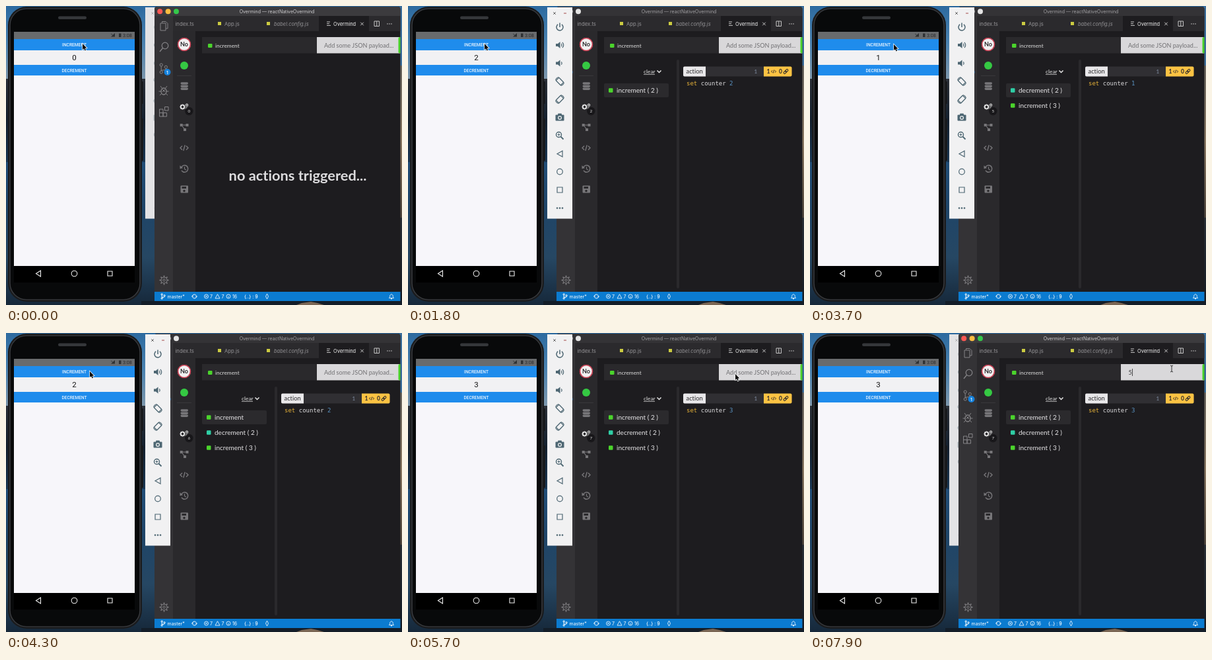
Animation, 600 px wide and 452 px high, one loop 8000 ms. Source, as an HTML page with a canvas:

```html
<!DOCTYPE html>
<html lang="en">
<head>
<meta charset="utf-8">
<title>State devtool demo</title>
<style>
html, body { margin: 0; width: 100%; height: 100%; overflow: hidden; background: #10263d; }
canvas { display: block; width: 100%; height: 100%; }
</style>
</head>
<body>
<canvas id="stage"></canvas>
<script>
const W = 600, H = 452, LOOP = 8000, TICK = 100;
const canvas = document.getElementById('stage');
const ctx = canvas.getContext('2d');
const ratio = Math.max(1, window.devicePixelRatio || 1);
canvas.width = W * ratio;
canvas.height = H * ratio;
ctx.letterSpacing = '0.01px'; // keeps letter pairs such as "ti" separate

const UI = 'Inter, sans-serif', TOOL = 'Lato, sans-serif';
const MONO = '"DejaVu Sans Mono", monospace', PHONE = 'Roboto, sans-serif';
const GREEN = '#4bd42c', TEAL = '#2fcfa6', GREY = '#858487', SLATE = '#4d6672';

// Timeline: [time, step]; the phone shows each result one tick later.
const ACTIONS = [[900, 1], [1400, 1], [2000, 1], [2900, -1], [3300, -1], [4000, 1], [4500, 1]];
const PATH = [[0, 116, 57], [2300, 116, 57], [2700, 120, 95], [3400, 120, 95], [3700, 127, 58],
  [5300, 127, 58], [5700, 496, 62], [6000, 519, 54], [7400, 519, 54], [7700, 548, 54], [8000, 548, 54]];
const TOOLBAR_UP = 500, EDITOR_UP = 6100, TYPED = 7600;

// Drawing helpers
function rect(x, y, w, h, color, r = 0) {
  ctx.fillStyle = color;
  ctx.beginPath();
  ctx.roundRect(x, y, w, h, r);
  ctx.fill();
}
function dot(x, y, r, color) {
  ctx.fillStyle = color;
  ctx.beginPath();
  ctx.arc(x, y, r, 0, Math.PI * 2);
  ctx.fill();
}
function ring(x, y, r, color, width = 1, from = 0, to = Math.PI * 2) {
  ctx.strokeStyle = color;
  ctx.lineWidth = width;
  ctx.beginPath();
  ctx.arc(x, y, r, from, to);
  ctx.stroke();
}
function box(x, y, w, h, color, width = 1, r = 0) {
  ctx.strokeStyle = color;
  ctx.lineWidth = width;
  ctx.beginPath();
  ctx.roundRect(x, y, w, h, r);
  ctx.stroke();
}
function trace(points, close) {
  ctx.beginPath();
  for (let i = 0; i < points.length; i += 2) ctx.lineTo(points[i], points[i + 1]);
  if (close) ctx.closePath();
}
function line(points, color, width = 1, close = false) {
  trace(points, close);
  ctx.strokeStyle = color;
  ctx.lineWidth = width;
  ctx.stroke();
}
function shape(points, color) {
  trace(points, true);
  ctx.fillStyle = color;
  ctx.fill();
}
function text(str, x, y, size, color, family = UI, align = 'left', style = '') {
  ctx.font = `${style} ${size}px ${family}`;
  ctx.fillStyle = color;
  ctx.textAlign = align;
  ctx.textBaseline = 'alphabetic';
  ctx.fillText(str, x, y);
}
function at(x, y, draw, angle = 0) {
  ctx.save();
  ctx.translate(x, y);
  ctx.rotate(angle);
  draw();
  ctx.restore();
}
function gradient(y0, y1, ...colors) {
  const g = ctx.createLinearGradient(0, y0, 0, y1);
  colors.forEach((c, i) => g.addColorStop(i / (colors.length - 1), c));
  return g;
}

// Shared icons, centred on the local origin
function gear(r, color, width = 1.1) {
  ring(0, 0, r * 0.65, color, width);
  for (let i = 0; i < 8; i++) {
    const c = Math.cos(i * Math.PI / 4), s = Math.sin(i * Math.PI / 4);
    line([c * r * 0.7, s * r * 0.7, c * r, s * r], color, width * 1.4);
  }
}
function codeMark(s, color, width) {
  line([-s * 0.5, -s * 0.5, -s, 0, -s * 0.5, s * 0.5], color, width);
  line([s * 0.5, -s * 0.5, s, 0, s * 0.5, s * 0.5], color, width);
  line([s * 0.2, -s * 0.7, -s * 0.2, s * 0.7], color, width);
}
function cross(s, color, width = 1) {
  line([-s, -s, s, s], color, width);
  line([-s, s, s, -s], color, width);
}
function branch(color, s) {
  ring(-s * 0.6, -s, s * 0.38, color);
  ring(-s * 0.6, s, s * 0.38, color);
  ring(s * 0.7, -s * 0.4, s * 0.38, color);
  line([-s * 0.6, -s * 0.6, -s * 0.6, s * 0.6], color);
  line([s * 0.7, 0, s * 0.5, s * 0.4, -s * 0.6, s * 0.5], color);
}
function speaker(waves) {
  shape([-6, -2, -3, -2, 0.5, -5, 0.5, 5, -3, 2, -6, 2], SLATE);
  for (let i = 1; i <= waves; i++) ring(0.5, 0, i * 2.6, SLATE, 1.2, -0.9, 0.9);
}
function rotateIcon(side) {
  at(0, 0, () => box(-3.2, -5, 6.4, 10, SLATE, 1.3, 0.5), -side * Math.PI / 4);
  const mid = side > 0 ? -Math.PI * 0.75 : -Math.PI * 0.25;
  ring(0, 0, 6.6, SLATE, 1.1, mid - 0.55, mid + 0.55);
  ring(0, 0, 6.6, SLATE, 1.1, mid + Math.PI - 0.55, mid + Math.PI + 0.55);
}

function desktop() {
  rect(0, 0, W, 110, gradient(0, 110, '#2d6a9f', '#4a82b0', '#7d97ac'));
  rect(0, 110, W, 126, gradient(110, 236, '#2b3038', '#14202e', '#1a3855'));
  rect(0, 236, W, 216, gradient(236, H, '#214e78', '#1f4568', '#264763', '#16283a'));
  rect(597, 0, 3, 90, '#3d6f9b');
  rect(597, 90, 3, 230, gradient(90, 320, '#6a665f', '#8a7862', '#51473d'));
  rect(597, 320, 3, 132, gradient(320, 452, '#2b3138', '#141a22'));
  rect(205, 446, 395, 6, '#131d28');
  shape([440, 452, 448, 449, 462, 447, 472, 449, 482, 452], '#7a6654');
}

function phone(value) {
  rect(205, 114, 3, 34, '#17191c', 1);
  rect(205, 170, 3, 64, '#17191c', 1);
  rect(3, 1, 203, 446, '#1a1b1d', 28);
  box(6, 4, 197, 440, '#3d3f43', 1.2, 25);
  rect(7, 5, 195, 438, '#08090a', 24);
  rect(79, 15.5, 43, 4.5, '#35373a', 2.2);
  rect(12, 39, 183, 354, '#f7f6fa');
  rect(12, 39, 183, 11, '#696b6d');
  shape([159, 46.5, 165, 46.5, 165, 41], '#2f3133');
  line([159, 42, 163, 45], '#2f3133', 0.8);
  rect(171, 41.5, 3.5, 5.5, '#2f3133', 0.5);
  text('3:08', 177, 47, 7.2, '#28292b', PHONE);
  rect(12, 50, 183, 17, '#1f8cec');
  rect(12, 67, 183, 22, '#f1f1f3');
  rect(12, 89, 183, 16, '#1f8cec');
  text('INCREMENT', 103.5, 60.8, 6.6, '#e8f4ff', PHONE, 'center', '500');
  text('DECREMENT', 103.5, 99.5, 6.5, '#e8f4ff', PHONE, 'center', '500');
  text(value, 103.5, 82, 11.5, '#151515', PHONE, 'center');
  rect(12, 393, 183, 25, '#000');
  line([52.5, 400, 45.5, 404.5, 52.5, 409], '#eee', 1.1, true);
  ring(103.5, 404.5, 4.3, '#eee', 1.1);
  box(154, 401, 7, 7, '#eee', 1.1);
}

function toolbar(active) {
  rect(211, 2, 38, 319.5, active ? '#f1f1f2' : '#e3e3e5');
  ctx.save();
  ctx.globalAlpha = active ? 1 : 0.35;
  at(222, 11, () => cross(1.8, '#555', 0.9));
  line([236, 11, 240, 11], '#a34848', 1);
  at(230, 32, () => {
    ring(0, 0, 5, SLATE, 1.5, -0.95, Math.PI + 0.95);
    line([0, -6.5, 0, 0], SLATE, 1.5);
  });
  at(230, 59, () => speaker(2));
  at(230, 86.5, () => speaker(1));
  at(230, 114, () => rotateIcon(1));
  at(230, 141, () => rotateIcon(-1));
  rect(223.5, 164.5, 13, 9, SLATE, 1);
  rect(227, 162.5, 6, 3, SLATE, 1);
  dot(230, 169, 3, '#f1f1f2');
  dot(230, 169, 1.8, SLATE);
  ring(228.5, 194.5, 4, SLATE, 1.4);
  line([231.5, 197.5, 235.5, 201.5], SLATE, 1.8);
  line([226.5, 194.5, 230.5, 194.5], SLATE);
  line([228.5, 192.5, 228.5, 196.5], SLATE);
  line([234, 219, 226, 223.5, 234, 228], SLATE, 1.2, true);
  ring(230, 250.5, 4.3, SLATE, 1.2);
  box(226, 274, 8, 8, SLATE, 1.2);
  [226, 230, 234].forEach(x => dot(x, 305.5, 1.3, SLATE));
  ctx.restore();
}

function activityBar() {
  rect(225, 15, 28, 417, '#343336');
  box(234, 26, 8, 11, GREY);
  line([236.5, 25.5, 236.5, 23.5, 242, 23.5, 245, 26.5, 245, 34, 242, 34], GREY);
  ring(241, 60, 4.8, GREY, 1.2);
  line([237.5, 63.5, 233, 69], GREY, 1.3);
  at(238.5, 94.5, () => branch(GREY, 5.5));
  dot(244.5, 100, 5, '#1481dc');
  text('1', 244.5, 102.5, 6.5, '#fff', UI, 'center', '600');
  at(239, 128, () => {
    ctx.strokeStyle = GREY;
    ctx.beginPath();
    ctx.ellipse(0, 1, 4, 5, 0, 0, Math.PI * 2);
    ctx.stroke();
    for (const s of [-1, 1]) {
      line([s * 2, -3, s * 5, -7], GREY);
      line([s * 4, 1, s * 7.5, 1], GREY);
      line([s * 3, 4, s * 6, 7], GREY);
    }
    cross(2, GREY);
  });
  box(232.5, 156, 5.5, 5.5, GREY);
  box(232.5, 161.5, 5.5, 5.5, GREY);
  box(238, 161.5, 5.5, 5.5, GREY);
  box(240.5, 152.5, 5.5, 5.5, GREY);
  at(239.5, 414.5, () => {
    gear(7, GREY);
    ring(0, 0, 1.7, GREY);
  });
}

function sidebar(count) {
  rect(253, 38, 34, 394, '#2a292c');
  dot(270, 58, 10, '#f2f0f1');
  ring(270, 58, 9.5, '#c83c50', 1.6);
  text('No', 270, 61.2, 9, '#29282b', TOOL, 'center', 'bold');
  dot(270, 90, 6, '#35c943');
  rect(259, 105, 22, 1, '#39383b');
  const dim = '#777679';
  for (let i = 0; i < 3; i++) rect(264.5, 115.2 + i * 4.2, 11.5, 3.5, dim, [3, 3, 4, 4]);
  at(267.5, 152.5, () => gear(4, '#f2f2f2', 1.4));
  at(274, 149.8, () => gear(2.2, '#f2f2f2', 0.8));
  at(274, 155.2, () => gear(2.2, '#f2f2f2', 0.8));
  dot(277.3, 159, 6.2, '#18171a');
  text(count, 277.3, 161.3, 6.5, '#d6d6d6', TOOL, 'center');
  line([265.5, 180, 274.5, 180], dim, 1.1);
  line([266, 180, 271, 187], dim, 1.1);
  rect(263.7, 178, 4, 4, dim);
  rect(272.5, 178, 4, 4, dim);
  rect(269, 185, 4, 4, dim);
  at(270, 214.5, () => codeMark(6, dim, 1.4));
  ring(270.5, 246, 5.2, dim, 1.5, -2.7, 2.6);
  shape([263.5, 241, 268, 245, 263.5, 246], dim);
  line([270.5, 243, 270.5, 246.5, 273, 248], dim, 1.1);
  rect(264.5, 271.5, 11.5, 11, dim, 1);
  rect(266.5, 273, 6.5, 3, '#2a292c');
  dot(270, 279.5, 1.7, '#2a292c');
}

function tabs() {
  rect(225, 15, 372.5, 23, '#2b2a2d');
  rect(225, 15, 28, 23, '#343336');
  rect(474, 15, 76, 23, '#1d1c1f');
  text('index.ts', 256.5, 30, 7.7, '#959497');
  rect(321, 24, 5, 5, '#cbcb41');
  text('App.js', 331, 30, 7.7, '#959497');
  rect(395, 24, 5, 5, '#cbcb41');
  text('babel.config.js', 406, 30, 7.5, '#959497', UI, 'left', 'italic');
  [[24, 491], [26.7, 490], [29.4, 492]].forEach(([y, x]) => line([486, y, x, y], '#c5c5c5'));
  text('Overmind', 496, 29.8, 7.4, '#f3f3f3');
  at(539.5, 27, () => cross(2.3, '#c8c8c8'));
  box(558, 23, 7.5, 7.5, '#c5c5c5');
  line([561.75, 23, 561.75, 30.5], '#c5c5c5');
  [578, 581, 584].forEach(x => dot(x, 27, 0.8, '#c5c5c5'));
}

function statusBar() {
  rect(225, 432, 372.5, 14, '#0b7bd0');
  at(238, 439, () => branch('#fff', 3));
  text('master*', 244.5, 441.7, 7, '#fff');
  ring(285.5, 439, 3, '#fff', 0.9, 0.3, 2.8);
  ring(285.5, 439, 3, '#fff', 0.9, 3.4, 5.9);
  shape([281, 439.5, 284, 439.5, 282.3, 437.3], '#fff');
  shape([287, 438.5, 290, 438.5, 288.7, 440.8], '#fff');
  ring(303.5, 439, 3, '#fff', 0.8);
  at(303.5, 439, () => cross(1.2, '#fff', 0.8));
  text('7', 309, 441.7, 7, '#fff');
  line([317, 442, 320.5, 435.7, 324, 442], '#fff', 0.8, true);
  text('7', 326.5, 441.7, 7, '#fff');
  ring(337, 439, 3, '#fff', 0.8);
  line([337, 438.5, 337, 441], '#fff', 0.8);
  text('16', 343, 441.7, 7, '#fff');
  text('{..} : 9', 361, 441.7, 7, '#fff', UI, 'left', '500');
  line([395.5, 435, 397.5, 439, 395.5, 443, 393.5, 439], '#fff', 0.8, true);
  line([580.5, 441.5, 581.7, 439.5, 581.7, 437.5, 584, 435.5, 586.3, 437.5, 586.3, 439.5, 587.5, 441.5],
    '#fff', 0.8, true);
  dot(584, 442.5, 0.9, '#fff');
}

function payload(t) {
  rect(297, 47, 174, 24.5, '#2a292c');
  rect(306, 57, 6.5, 6, GREEN, 1.2);
  text('increment', 317, 62.7, 8.3, '#dedede', TOOL);
  rect(471, 47, 126, 24.5, '#d9d8da');
  rect(594.5, 47, 3, 24.5, GREEN, [2, 0, 0, 2]);
  if (t >= TYPED) text('5', 482.5, 62.5, 9, '#3c3c3e', TOOL);
  else text('Add some JSON payload...', 482, 62.5, 9.1, '#717073', TOOL);
  const blink = t >= TYPED || Math.floor((t - EDITOR_UP) / 600) % 2 === 0;
  if (t >= EDITOR_UP && blink) rect(t >= TYPED ? 488 : 482.5, 54, 0.8, 11, '#222');
}

function grouped(steps) {
  const groups = [];
  for (const step of steps) {
    if (groups.length && groups[0].step === step) groups[0].n++;
    else groups.unshift({ step, n: 1 });
  }
  return groups;
}

function actionPanel(steps) {
  if (!steps.length) {
    text('no actions triggered...', 442, 264, 21.8, '#dcdbdd', TOOL, 'center', 'bold');
    return;
  }
  rect(407, 81, 4, 346, '#2a292c', 2);
  text('clear', 357, 101.5, 8.4, '#e6e6e6', TOOL);
  rect(357, 103, 17, 0.7, '#e6e6e6');
  line([377.5, 97.5, 380.5, 100.5, 383.5, 97.5], '#e6e6e6', 1.5);
  rect(297, 117, 98, 21, '#2b2a2d', 2);
  grouped(steps).forEach(({ step, n }, i) => {
    const y = 127.5 + i * 23;
    rect(304, y - 3.3, 6.5, 6.5, step > 0 ? GREEN : TEAL, 1.2);
    const name = step > 0 ? 'increment' : 'decrement';
    text(n > 1 ? `${name} ( ${n} )` : name, 316, y + 3.2, 10, '#e6e5e7', TOOL);
  });
  rect(417, 91.5, 164.5, 15, '#302f33', 2);
  rect(417, 91.5, 34, 15, '#e9e8ea', [2, 0, 0, 2]);
  text('action', 421.5, 102, 9.3, '#29282b', TOOL);
  text('1', 524.5, 102, 8, '#8493a8', TOOL);
  rect(539, 91.5, 42.5, 15, '#fcc343', [0, 2, 2, 0]);
  text('1', 543.5, 102, 8.5, '#29282b', TOOL, 'left', 'bold');
  at(554, 99, () => codeMark(3.6, '#29282b', 0.9));
  text('0', 562, 102, 8.5, '#29282b', TOOL, 'left', 'bold');
  at(572.5, 99, () => {
    box(-4.2, -1.5, 4.8, 3, '#29282b', 1, 1.5);
    box(-0.6, -1.5, 4.8, 3, '#29282b', 1, 1.5);
  }, -Math.PI / 4);
  const value = steps.reduce((a, b) => a + b, 0);
  text('set', 422, 119.5, 9, '#e8b339', MONO);
  text('counter', 443.7, 119.5, 9, '#dddcde', MONO);
  text(value, 487, 119.5, 9, '#5a94c4', MONO);
}

function editor(t, steps, active) {
  rect(225, 1, 372.5, 445, '#1d1c1f', 4);
  rect(225, 1, 372.5, 14, active ? '#3c3b3e' : '#343336', [4, 4, 0, 0]);
  const lights = active ? ['#fc5753', '#fdbc40', '#34c84a'] : ['#e4e4e4', '#e4e4e4', '#e4e4e4'];
  lights.forEach((c, i) => dot(233.2 + i * 12.4, 8.2, 4, c));
  text('Overmind — reactNativeOvermind', 410.5, 11.3, 7, active ? '#cfced0' : '#a09fa2', UI, 'center');
  tabs();
  activityBar();
  sidebar(steps.length);
  payload(t);
  actionPanel(steps);
  statusBar();
}

function pointer(t) {
  const i = Math.max(1, PATH.findIndex(p => p[0] > t));
  const [t0, x0, y0] = PATH[i - 1], [t1, x1, y1] = PATH[i];
  const u = (t - t0) / (t1 - t0), k = u * u * (3 - 2 * u);
  at(x0 + (x1 - x0) * k, y0 + (y1 - y0) * k, () => {
    if (t >= EDITOR_UP - TICK) {
      line([-2, -5, 0, -4, 2, -5], '#222', 0.9);
      line([-2, 5, 0, 4, 2, 5], '#222', 0.9);
      line([0, -4, 0, 4], '#222', 0.9);
      return;
    }
    const arrow = [0, 0, 0, 9, 2, 7.2, 3.6, 10.5, 5, 9.8, 3.6, 6.7, 6.3, 6.5];
    line(arrow, '#fff', 1.4, true);
    shape(arrow, '#0a0a0a');
  });
}

function draw(t) {
  const done = time => ACTIONS.filter(a => a[0] <= time).map(a => a[1]);
  const active = t < TOOLBAR_UP || t >= EDITOR_UP;
  ctx.setTransform(ratio, 0, 0, ratio, 0, 0);
  desktop();
  phone(done(t - TICK).reduce((a, b) => a + b, 0));
  if (active) toolbar(false);
  editor(t, done(t), active);
  if (!active) toolbar(true);
  pointer(t);
}

const start = performance.now();
function loop() {
  const t = (performance.now() - start) % LOOP;
  draw(Math.floor(t / TICK) * TICK);
  requestAnimationFrame(loop);
}
loop();
</script>
</body>
</html>
```
